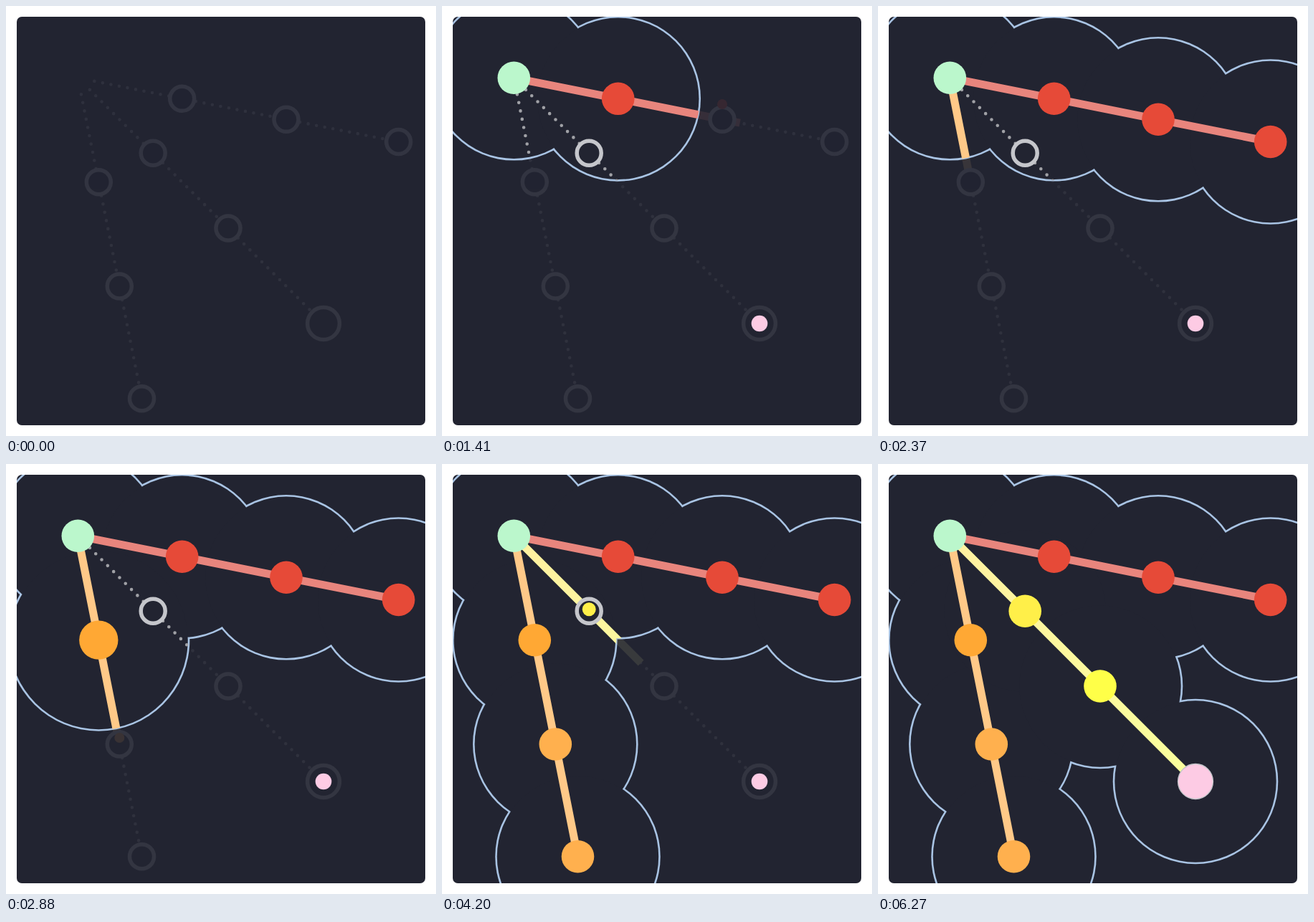
Recreate the animation shown at these times as an HTML page. Size 600 px wide and 600 px high, loop 6300 ms.

```html
<!DOCTYPE html>
<html lang="en">
<head>
<meta charset="utf-8">
<title>Branching paths</title>
<style>
  html, body { margin: 0; width: 100%; height: 100%; overflow: hidden; background: #fff; }
  svg { display: block; width: 100vw; height: 100vh; }
</style>
</head>
<body>
<svg id="stage" viewBox="0 0 600 600">
  <defs>
    <clipPath id="card"><rect x="15" y="15" width="570" height="570" rx="7"/></clipPath>
    <clipPath id="seen"></clipPath>
    <linearGradient id="glow" gradientUnits="userSpaceOnUse" x1="100" y1="100" x2="443" y2="443">
      <stop offset="0" stop-color="#fff0a0"/>
      <stop offset="1" stop-color="#f9ff9c"/>
    </linearGradient>
  </defs>
  <g clip-path="url(#card)">
    <rect width="600" height="600" fill="#222431"/>
    <g id="dim" opacity="0.1"></g>
    <g id="rim" fill="#a9c4e4"></g>
    <g id="inside" fill="#222431"></g>
    <g id="bright" clip-path="url(#seen)"></g>
    <g id="top"></g>
  </g>
</svg>
<script>
const LOOP = 6300, STEP = 450, FIRST = 440, BRANCH_LAG = 1500;
const NODE_R = 22.8, SIGHT_R = 114, RIM = 1.3;
const BG = '#222431';
const $ = id => document.getElementById(id);
const clamp = x => Math.min(1, Math.max(0, x));
const span = (t, a, b) => clamp((t - a) / (b - a));
const easeOut = x => 1 - (1 - x) ** 2;
const easeInOut = x => x < .5 ? 2 * x * x : 1 - 2 * (1 - x) ** 2;
const mix = (a, b, x) => a + (b - a) * x;

function add(parent, tag, attrs) {
  const el = document.createElementNS('http://www.w3.org/2000/svg', tag);
  set(el, attrs);
  parent.appendChild(el);
  return el;
}
function set(el, attrs) {
  for (const key in attrs) el.setAttribute(key, attrs[key]);
}

const root = { x: 100.3, y: 100.3, color: '#bbf7cc', start: 40, seed: 7, full: NODE_R };
const branches = [
  { stroke: '#e8857d', nodes: [[245.7, 129.3, '#e64a38'], [391, 158.3, '#e64a38'], [547.7, 189.5, '#e64a38']] },
  { stroke: '#ffc988', nodes: [[129.3, 245.7, '#ffa834'], [158.3, 391, '#ffb04e'], [189.5, 547.7, '#ffb04e']] },
  { stroke: 'url(#glow)', nodes: [[205.2, 205.2, '#ffef49'], [310, 310, '#ffff48'], [443, 443, '#fdcbe4']] }
];
branches.forEach((branch, b) => {
  branch.start = FIRST + b * BRANCH_LAG;
  branch.nodes = branch.nodes.map(([x, y, color], i) => ({
    x, y, color, start: branch.start + (i + 1) * STEP, seed: 7, full: NODE_R
  }));
});
const goal = branches[2].nodes[2];
Object.assign(goal, { isGoal: true, seed: 11.3, full: 23.6 });
const nodes = [root, ...branches.flatMap(b => b.nodes)];

// The same scene is drawn twice: faint everywhere, vivid inside the seen area.
function buildScene(layer) {
  const scene = { lines: [], dots: [] };
  for (const branch of branches) {
    let prev = root;
    for (const node of branch.nodes) {
      const dx = node.x - prev.x, dy = node.y - prev.y, len = Math.hypot(dx, dy);
      const from = (prev === root ? 23.5 : 19.5) / len, to = 1 - 18 / len;
      add(layer, 'line', {
        x1: prev.x + dx * from, y1: prev.y + dy * from,
        x2: prev.x + dx * to, y2: prev.y + dy * to,
        stroke: '#a0a1a6', 'stroke-width': 4.6, 'stroke-linecap': 'round', 'stroke-dasharray': '0 11.75'
      });
      prev = node;
    }
  }
  for (const branch of branches)
    scene.lines.push(add(layer, 'polyline', { fill: 'none', stroke: branch.stroke, 'stroke-width': 11 }));
  for (const node of nodes.slice(1))
    add(layer, 'circle', {
      cx: node.x, cy: node.y, r: node.isGoal ? 22.4 : 17,
      fill: BG, stroke: '#c5c6cb', 'stroke-width': 5.5
    });
  for (const node of nodes)
    scene.dots.push(add(layer, 'circle', { cx: node.x, fill: node.color }));
  return scene;
}
const scenes = [buildScene($('dim')), buildScene($('bright'))];
const goalDot = add($('top'), 'circle', { cx: goal.x, fill: goal.color });
const sights = nodes.map(({ x, y }) => [['rim', RIM], ['inside', -RIM], ['seen', 0]].map(
  ([id, grow]) => ({ grow, el: add($(id), 'circle', { cx: x, cy: y, r: 0 }) })));

// A small dot hops, lands, then bursts past its full size and settles.
function pose(node, t) {
  const e = t - node.start;
  const hop = e < 115 ? easeOut(span(e, 25, 115)) : 1 - span(e, 115, 320) ** 2;
  const settle = easeInOut(span(e, 480, 523));
  const peak = node.full * 1.22;
  let r = node.seed * span(e, 0, 25);
  if (e > 300) r = mix(mix(node.seed, peak, easeOut(span(e, 300, 480))), node.full, settle);
  let y = node.y - 28 * hop;
  if (node.isGoal && e < 25) {
    const age = Math.max(0, t - 60 + 15), fade = Math.exp(-age / 200);
    r = t < 60 ? 0 : node.seed * (1 - fade * Math.cos(Math.PI * age / 150));
    y = node.y + 8 * fade * Math.sin(Math.PI * age / 300);
  }
  const sight = mix(127.5 * easeOut(span(e, 320, 475)), SIGHT_R, settle);
  return { y, r, sight: e > 320 ? sight : 0 };
}

function linePoints(branch, t) {
  let prev = root;
  const points = [[root.x, root.y]];
  for (const node of branch.nodes) {
    const p = span(t, node.start - STEP, node.start);
    if (p > 0) points.push([mix(prev.x, node.x, p), mix(prev.y, node.y, p)]);
    prev = node;
  }
  return points.length > 1 ? points.join(' ') : '';
}

function draw(t) {
  const poses = nodes.map(node => pose(node, t));
  const paths = branches.map(branch => linePoints(branch, t));
  for (const scene of scenes) {
    scene.lines.forEach((line, i) => set(line, { points: paths[i] }));
    scene.dots.forEach((dot, i) => set(dot, { cy: poses[i].y, r: poses[i].r }));
  }
  const { y, r } = poses[nodes.indexOf(goal)];
  set(goalDot, { cy: y, r });
  sights.forEach((group, i) => group.forEach(({ el, grow }) =>
    set(el, { r: poses[i].sight ? Math.max(0, poses[i].sight + grow) : 0 })));
}

const begin = performance.now();
function tick() {
  draw((performance.now() - begin) % LOOP);
  requestAnimationFrame(tick);
}
tick();
</script>
</body>
</html>
```
